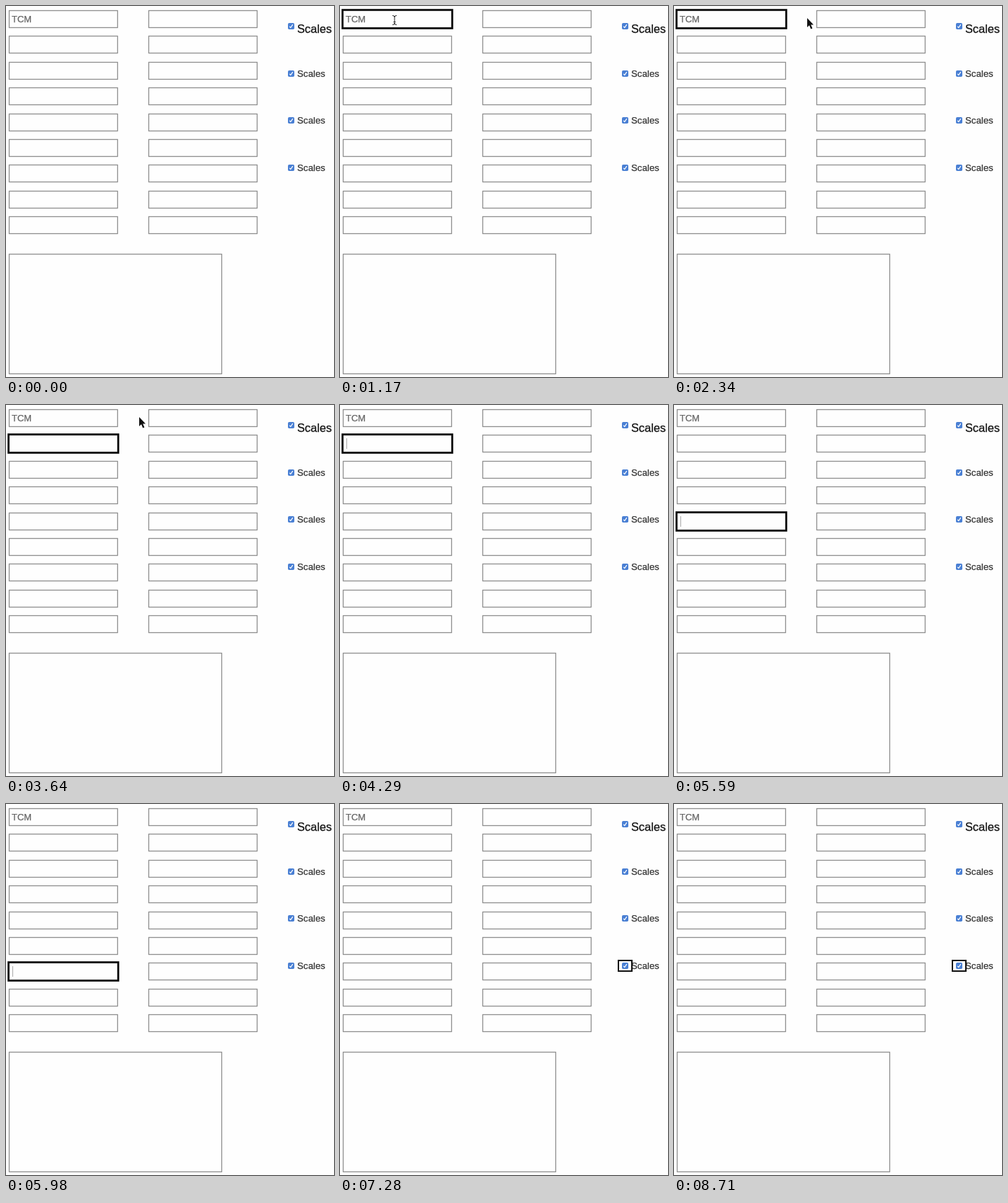
Write an HTML page with a canvas that moves like this. It is 463 by 524 pixels and loops after 9100 ms.

```html
<!DOCTYPE html>
<html lang="en">
<head>
<meta charset="utf-8">
<title>Tab order</title>
<style>
  html, body { margin: 0; width: 100%; height: 100%; overflow: hidden; background: #fefefe; }
  canvas { display: block; width: 463px; height: 524px; }
</style>
</head>
<body>
<canvas id="stage"></canvas>
<script>
const W = 463, H = 524, LOOP = 9100, TICK = 130, BLINK = 520;
const canvas = document.getElementById('stage');
const ctx = canvas.getContext('2d');
const dpr = window.devicePixelRatio || 1;
canvas.width = W * dpr;
canvas.height = H * dpr;

const COLS = [4.5, 201.5], ROWS = 9, BOX_W = 153, BOX_H = 24;
const CHECKS = [28.5, 95.5, 161.5, 228.5];
const FONT = '"Liberation Sans", Arial, sans-serif';
const BORDER = '#8f8f8f';
const rowY = i => 6.5 + Math.round(36.4 * i);

// Keyboard focus over time: a field (row, col) or a check box
const FOCUS = [
  { at: 520, row: 0, col: 0 },
  { at: 3120, row: 1, col: 0 },
  { at: 4940, row: 2, col: 0 },
  { at: 5200, row: 3, col: 0 },
  { at: 5590, row: 4, col: 0 },
  { at: 5720, row: 5, col: 0 },
  { at: 5980, row: 6, col: 0 },
  { at: 6240, row: 6, col: 1 },
  { at: 6890, check: 3 }
];

// Mouse moves; the pointer rests at the end of each one until it hides
const MOVES = [
  { start: 130, end: 650, from: [112, 229], to: [77, 20], until: 1690 },
  { start: 1690, end: 2340, from: [77, 20], to: [188, 17], until: 4290 },
  { start: 7930, end: 8580, from: [188, 34], to: [67, 512], until: 8710 }
];

const ease = p => p * p * (3 - 2 * p);

// A hairline outline gives the slightly heavier glyphs
function text(str, x, y, size, color) {
  ctx.font = size + 'px ' + FONT;
  ctx.fillStyle = ctx.strokeStyle = color;
  ctx.lineWidth = 0.25;
  ctx.fillText(str, x, y);
  ctx.strokeText(str, x, y);
}

function frame(x, y, w, h, color, line) {
  ctx.strokeStyle = color;
  ctx.lineWidth = line;
  ctx.strokeRect(x, y, w, h);
}

function path(points, close) {
  ctx.beginPath();
  points.forEach(([x, y]) => ctx.lineTo(x, y));
  if (close) ctx.closePath();
}

function checkBox(y) {
  ctx.fillStyle = '#4a80d4';
  ctx.beginPath();
  ctx.roundRect(398, y - 4.5, 9, 9, 1.8);
  ctx.fill();
  ctx.strokeStyle = '#fff';
  ctx.lineWidth = 1.2;
  path([[400.2, y + 0.3], [401.8, y + 2.1], [404.8, y - 2.3]]);
  ctx.stroke();
}

function drawForm() {
  for (const x of COLS)
    for (let i = 0; i < ROWS; i++) frame(x, rowY(i), BOX_W, BOX_H, BORDER, 1.3);
  frame(4.5, 350.5, 300, 169, BORDER, 1.3);
  text('TCM', 8, 23, 13, '#666');
  CHECKS.forEach((y, i) => {
    checkBox(y);
    if (i) text('Scales', 411, y + 4.5, 13.2, '#333');
    else text('Scales', 411, 38, 16.3, '#111');
  });
}

function drawFocus(t) {
  const f = FOCUS.filter(s => s.at <= t).pop();
  if (!f) return;
  if (f.check !== undefined) {
    frame(393, CHECKS[f.check] - 7.5, 19, 15, '#111', 2);
    return;
  }
  const x = COLS[f.col], y = rowY(f.row);
  frame(x - 1, y - 1, BOX_W + 2, BOX_H + 2, '#0a0a0a', 2.6);
  if (Math.floor((t - f.at) / BLINK) % 2 === 0) {
    ctx.fillStyle = '#aaa';
    ctx.fillRect(f.row ? x + 4.5 : 36, y + 4.5, 1, 15);
  }
}

function arrow(x, y) {
  path([[0, 0], [0, 13], [3, 10.3], [5.2, 15.5], [7.4, 14.5], [5.2, 9.6], [9, 9.4]]
    .map(([a, b]) => [x + a, y + b]), true);
  ctx.lineJoin = 'round';
  ctx.strokeStyle = '#fff';
  ctx.lineWidth = 1.6;
  ctx.stroke();
  ctx.lineJoin = 'miter';
  ctx.fillStyle = '#111';
  ctx.fill();
}

function beam(x, y) {
  ctx.strokeStyle = '#222';
  ctx.lineWidth = 1;
  ctx.beginPath();
  for (const s of [-1, 1]) {
    ctx.moveTo(x - 3, y + 6.5 * s);
    ctx.quadraticCurveTo(x, y + 6.5 * s, x, y + 4.5 * s);
    ctx.quadraticCurveTo(x, y + 6.5 * s, x + 3, y + 6.5 * s);
  }
  ctx.moveTo(x, y - 5);
  ctx.lineTo(x, y + 5);
  ctx.moveTo(x - 1.5, y + 2.5);
  ctx.lineTo(x + 1.5, y + 2.5);
  ctx.stroke();
}

const inside = (x, y, l, t, w, h) => x > l && x < l + w && y > t && y < t + h;

function overField(x, y) {
  if (inside(x, y, 4.5, 350.5, 300, 169)) return true;
  for (const l of COLS)
    for (let i = 0; i < ROWS; i++)
      if (inside(x, y, l, rowY(i), BOX_W, BOX_H)) return true;
  return false;
}

function drawPointer(t) {
  const m = MOVES.find(s => t >= s.start && t < s.until);
  if (!m) return;
  const p = ease(Math.min(1, (t - m.start) / (m.end - m.start)));
  const [x, y] = m.from.map((a, i) => a + (m.to[i] - a) * p);
  (overField(x, y) ? beam : arrow)(x, y);
}

function draw(now) {
  const t = Math.floor((now % LOOP) / TICK) * TICK;
  ctx.setTransform(dpr, 0, 0, dpr, 0, 0);
  ctx.fillStyle = '#fefefe';
  ctx.fillRect(0, 0, W, H);
  drawForm();
  drawFocus(t);
  drawPointer(t);
}

const begin = performance.now();
function loop() {
  draw(performance.now() - begin);
  requestAnimationFrame(loop);
}
loop();
</script>
</body>
</html>
```
